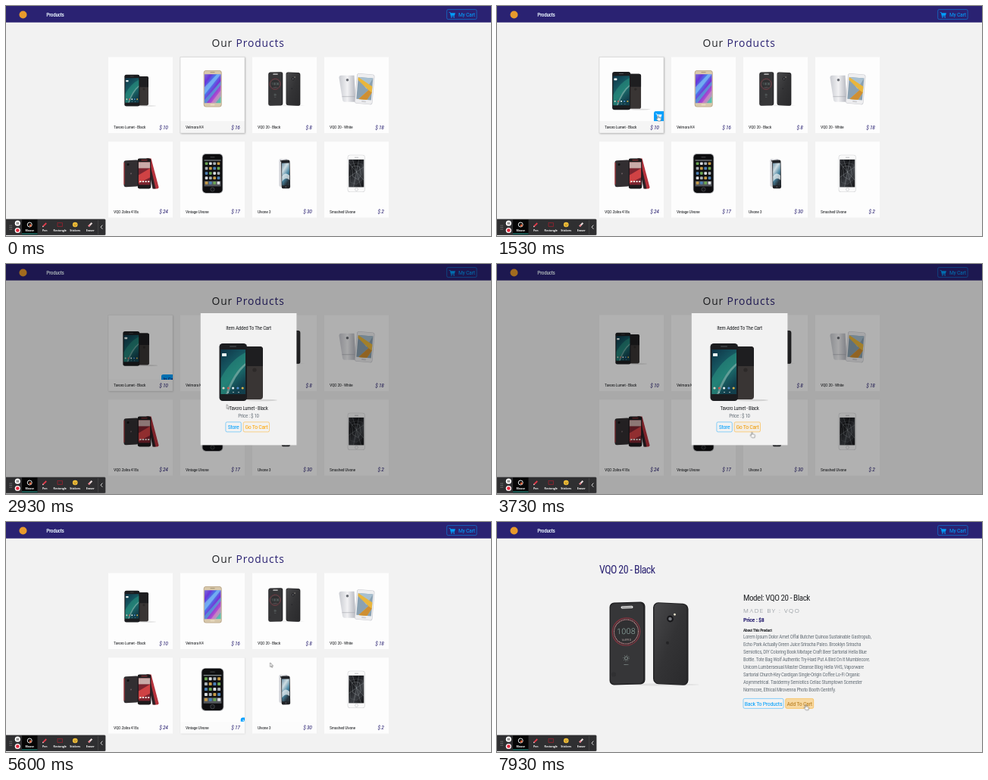
These frames come from a looping animation (640x304 px, 8 s). An HTML page:

```html
<!DOCTYPE html>
<html lang="en">
<head>
<meta charset="utf-8">
<title>Phone shop</title>
<style>
@property --h { syntax: '<number>'; inherits: true; initial-value: 0 }
@property --c { syntax: '<number>'; inherits: true; initial-value: 0 }
@property --f { syntax: '<number>'; inherits: true; initial-value: 0 }
@property --hand { syntax: '<number>'; inherits: true; initial-value: 0 }
html, body { margin: 0; width: 100%; height: 100%; overflow: hidden; background: #f2f2f2 }
body > svg { display: block; width: 100vw; height: 100vh }
text { font-family: 'Roboto Condensed', 'Open Sans Condensed', Roboto, sans-serif; font-stretch: 75%; letter-spacing: -.04em; white-space: pre }
.wide { font-family: 'Open Sans', 'Noto Sans', sans-serif; font-stretch: 100%; letter-spacing: .9px }
.airy { letter-spacing: 1.5px; font-weight: 300 }
.clock { letter-spacing: .2px; font-weight: 300 }
.label { font-family: 'Open Sans', 'Noto Sans', sans-serif; font-weight: 700; letter-spacing: 0 }
.k { animation: 8s linear infinite }
.cut { animation: 8s step-end infinite }

/* --h: picture hover, --c: card hover */
.zoom { transform: scale(calc(1 + .2 * var(--h))) }
.slide { transform: translate(calc(13px * (1 - var(--h))), calc(13px * (1 - var(--h)))) }
.lift { opacity: var(--c) }
.shade { filter: blur(.9px) }
@keyframes card0 { 0%, 5% { --h: 0; --c: 0 } 17.5%, 30% { --h: 1; --c: 1 } 42.5%, 100% { --h: 0; --c: 0 } }
@keyframes card1 { 0%, 2.5% { --c: 1 } 15%, 100% { --c: 0 } }
@keyframes card2 { 0%, 73.1% { --h: 0; --c: 0 } 81.6%, 100% { --h: .68; --c: .68 } }
@keyframes card5 { 0%, 62.5% { --h: 0; --c: 0 } 68.75% { --h: .5; --c: .3 } 75%, 100% { --h: 0; --c: 0 } }
@keyframes card6 { 0%, 69.5% { --h: 0; --c: 0 } 73.1% { --h: .29; --c: .29 } 76.7%, 100% { --h: 0; --c: 0 } }

/* --f: button fill */
.btn rect { fill: var(--col); fill-opacity: var(--f); stroke: var(--col); stroke-width: .45 }
.btn text { fill: color-mix(in srgb, #2a2a52 calc(var(--f) * 100%), var(--col)) }
@keyframes store { 0%, 56% { --f: 0 } 61.5%, 100% { --f: 1 } }
@keyframes goCart { 0%, 46.2% { --f: 0 } 52.4%, 54% { --f: .9 } 60%, 100% { --f: 0 } }
@keyframes addCart { 0%, 96.3% { --f: 0 } 100% { --f: .44 } }

@keyframes list { 0% { visibility: visible } 81.6%, 100% { visibility: hidden } }
@keyframes detail { 0% { visibility: hidden } 81.6%, 100% { visibility: visible } }
@keyframes modal { 0% { visibility: hidden } 24.2% { visibility: visible } 62.5%, 100% { visibility: hidden } }
@keyframes before { 0% { opacity: 1 } 24.2%, 100% { opacity: 0 } }
@keyframes after { 0% { opacity: 0 } 24.2%, 100% { opacity: 1 } }
@keyframes ring {
  0% { opacity: 0 } 23.25% { opacity: 1 } 25.75% { opacity: 0 }
  61.5% { opacity: 1 } 64% { opacity: 0 } 80% { opacity: 1 } 81.8%, 100% { opacity: 0 }
}
@keyframes move {
  0%, 1% { transform: translate(262px, 161px) }
  5% { transform: translate(219px, 150px) }
  8%, 28.75% { transform: translate(212.5px, 145px) }
  37.5% { transform: translate(300px, 190px) }
  44%, 54% { transform: translate(336.5px, 222.5px) }
  57.5%, 62.5% { transform: translate(299px, 216px) }
  66% { transform: translate(302px, 212px) }
  68.75% { transform: translate(316px, 204px) }
  70% { transform: translate(348.5px, 186px) }
  71.5% { transform: translate(360px, 178px) }
  73.1% { transform: translate(366px, 167px) }
  77%, 87.5% { transform: translate(368px, 120px) }
  88.25%, 90% { transform: translate(380px, 150px) }
  90.75%, 96.6% { transform: translate(396px, 200px) }
  97.5%, 100% { transform: translate(407.5px, 241.5px) }
}
@keyframes shape {
  0% { --hand: 0 } 5% { --hand: 1 } 31% { --hand: 0 } 43% { --hand: 1 } 62.5% { --hand: 0 }
  71.5% { --hand: 1 } 82% { --hand: 0 } 97.2%, 100% { --hand: 1 }
}
@keyframes appear { 0% { opacity: 0 } .75%, 100% { opacity: 1 } }
.hand { opacity: var(--hand) }
.arrow { opacity: calc(1 - var(--hand)) }
</style>
</head>
<body>
<svg id="stage" viewBox="0 0 640 304" preserveAspectRatio="none"></svg>
<script>
const BLUE = '#2a2272', SKY = '#009ffd', GOLD = '#ffa400', DARK = '#232528', GREY = '#6c757d';

const rect = (x, y, w, h, fill, r = 0, more = '') =>
  `<rect x="${x}" y="${y}" width="${w}" height="${h}" rx="${r}" fill="${fill}" ${more}/>`;
const dot = (x, y, r, fill, more = '') => `<circle cx="${x}" cy="${y}" r="${r}" fill="${fill}" ${more}/>`;
const path = (d, fill, more = '') => `<path d="${d}" fill="${fill}" ${more}/>`;
const line = (d, color, width) => path(d, 'none', `stroke="${color}" stroke-width="${width}"`);
const text = (x, y, size, str, fill = DARK, more = '') =>
  `<text x="${x}" y="${y}" font-size="${size}" fill="${fill}" ${more}>${str}</text>`;
const at = (x, y, body, more = '') => `<g transform="translate(${x} ${y}) ${more}">${body}</g>`;
const show = (name, body) => `<g class="cut" style="animation-name:${name}">${body}</g>`;
const grad = (id, x2, y2, ...stops) => `<linearGradient id="${id}" x2="${x2}" y2="${y2}">` +
  stops.map((c, i) => `<stop offset="${i / (stops.length - 1)}" stop-color="${c}"/>`).join('') + '</linearGradient>';
const mid = 'text-anchor="middle"', bold = 'font-weight="700"';

const cartIcon = (color) => path('M0 0h1.7l.4 1.2h6.2l-1 3.5H3l.2.8h4.1v.8H2.5L1.2.8H0z', color) +
  dot(3.2, 7, .8, color) + dot(6.6, 7, .8, color);

const button = (x, y, w, label, col, name = '') =>
  `<g class="btn k" style="--col:${col};animation-name:${name || 'none'}">` +
  rect(x, y, w, 13, 'none', 1.8) + text(x + w / 2, y + 9.4, 7.9, label, col, mid) + '</g>';

const defs = '<defs>' +
  grad('teal', .5, 1, '#0f3346', '#14505c', '#1c6c6c', '#123f4c') +
  grad('violet', .8, 1, '#7a6fd8', '#6a35d8', '#3d8ff0', '#7a2fd6', '#b04fd0', '#56c2b0') +
  grad('silver', 1, 0, '#c9cbd1', '#f1f1f3', '#b4b6be') +
  grad('black', 1, 1, '#48484a', '#333335', '#2a2a2c') +
  grad('mist', .5, 1, '#6f93a8', '#cfdde3', '#4a87a3', '#26323a') +
  grad('glass', .8, 1, '#34363b', '#141518', '#3c3f44', '#1c1d20') + '</defs>';

// Phones, each drawn around its own centre
const tealPhone =
  `<ellipse cx="17" cy="37" rx="21" ry="1.3" fill="#000" opacity=".13"/>` +
  rect(-13, -34, 32, 70, '#393534', 4) + path('M-9-34H15q4 0 4 4V-8H-13z', '#1e1e20') +
  dot(8, -3, 2.6, '#2c2928') +
  rect(-38.5, -38, 36.5, 76, '#1b1c1f', 4.5) + rect(-36.5, -30, 32.5, 59, 'url(#teal)') +
  path('M-36.5 8Q-24-16-4-26V-12Q-20 0-30 29h-6.5z', '#2c9a84', 'opacity=".5"') +
  path('M-30 29Q-20 0-4-12V-9Q-18 4-27 29z', '#a9d3c6', 'opacity=".5"') +
  rect(-35, -25, 6, 4, '#e9f2f2', .6) + rect(-25, -34.5, 9, .9, '#55585c', .4) +
  ['#d9d4c8', '#c95a50', '#e6eef0', '#4f8fd0', '#d6b24c'].map((c, i) => dot(-33 + i * 6.3, 21, 1.6, c)).join('') +
  [0, 1, 2].map(i => dot(-27 + i * 7, 26.5, .7, '#e8eeee')).join('');

const goldPhone = rect(-11.8, -24.3, 24, 48.6, '#b9a587', 3.5) + rect(-11, -23.5, 22.4, 47, '#d8c8ab', 3) +
  rect(-10.6, -19, 21.6, 38, 'url(#violet)') +
  path('M-10.6-2 6-19H11L-10.6 8z', '#8fc7f5', 'opacity=".6"') +
  path('M-10.6 15 11-10V-5L-8 19h-2.6z', '#3fd0d8', 'opacity=".55"') +
  path('M11 2v8L4 19H-2z', '#ef9ac0', 'opacity=".5"') +
  rect(-3, -21.8, 6, .7, '#8f7d5b') + rect(-3, 20.2, 6, 2, '#e7dac0', 1);

const blackPhone =
  `<ellipse cx="20" cy="54" rx="46" ry="1.5" fill="#000" opacity=".07"/>` +
  `<g transform="translate(-29 0) skewY(-1.5)">` +
  rect(-23.5, -55, 47, 109, '#232325', 6) + rect(-22, -53.5, 43, 106, '#363638', 5) +
  rect(-8.5, -50, 16, 3.2, '#e4e4e4', 1.6) + rect(-7, -48.9, 13, 1, '#777') +
  dot(-1.5, -16, 18.2, '#303032', 'stroke="#85333f" stroke-width="1.2"') +
  dot(-1.5, -16, 16, 'none', 'stroke="#d08a90" stroke-width="1.1" stroke-dasharray="1.2 .6"') +
  text(-1.5, -13, 10.5, '1008', '#a9c8c0', mid + ' class="wide clock"') +
  text(-1.5, -4, 3.8, '14 APR D', '#b9a9a9', mid) +
  dot(-1.5, 19, 2.1, 'none', 'stroke="#9fb0ac" stroke-width=".7"') +
  dot(-1.5, 19, 3.8, 'none', 'stroke="#9fb0ac" stroke-width=".9" stroke-dasharray=".7 2.3"') +
  rect(-4.5, 27, 6, .6, '#8d9996') + dot(-18, 40, 3, '#303032') + '</g>' +
  `<g transform="translate(28 0) skewY(2.5)">` +
  rect(-23, -54, 46.5, 108, '#222224', 7) + rect(-21.5, -53, 43, 106, 'url(#black)', 6) +
  dot(-.5, -33, 4.4, '#17171a') + dot(-.5, -33, 2.3, '#77797e') + dot(5.5, -39, 1.4, '#e6e0cb') +
  dot(-4, -1, 2, '#242426') + '</g>';

const whitePhone = path('M-20-18H-3L-1 17H-16Q-18 17-18.500 14L-23-15Q-23-18-20-18z', 'url(#silver)') +
  dot(-12, -12, 1.8, '#6b6e75') + line('M-19 10-2 10', '#a3a5ac', .6) +
  at(11, 0, rect(-12, -20, 23.5, 40, '#c9cacf', 3) + rect(-11.4, -19.4, 22.3, 38.8, '#eeeef0', 2.6) +
  rect(-10, -15, 19.6, 29, '#8aa1b2') + path('M-10-15H9.600L2 0z', '#a8c0d0') +
  path('M-10-11 5 1-7 14H4L9.600 4V-4L-10-15z', '#e9b63c') + path('M5 1-7 14H4L9.600 4z', '#cf8f32') +
  rect(-3, 15.6, 6, 2, '#cfd0d4', 1), 'rotate(5)');

const redPhone = path('M8-20H14L24 18Q24 20 22 20H17z', '#b5323c') + path('M8-20H11L20 20H16z', '#2d2226') +
  at(-12.5, 0, rect(-9.5, -17.5, 19, 35, '#322e31', 2.6) + line('M-9-15V14', '#c63d43', 1) +
  dot(-4, -12, 1.5, '#111') + dot(0, 0, 1, '#6b5c60'), 'skewY(-3)') +
  at(5, 0, rect(-8.8, -20, 17.6, 40, '#1d1a1c', 2.4) + rect(-7.6, -15, 15.2, 30, '#7c2530') +
  rect(-7.6, -15, 15.2, 8, '#c9aaa8') + path('M-7.6 2 7.6-7V5L-7.6 13z', '#cf4244') +
  [0, 1, 2, 3].map(i => rect(-6.2 + i * 3.6, 9.5, 2.2, 2.2, '#eadfd9', .4)).join('') + rect(-4, -18, 8, .8, '#c63d43'));

const iconColors = ['#6aa552', '#c79b45', '#d9dde0', '#4a7fb5', '#a9b0b6'];
const classicPhone = rect(-13.8, -26.3, 27.6, 52.6, '#a5a7aa', 5) + rect(-13, -25.5, 26, 51, '#0e0e10', 4.4) +
  rect(-3, -22, 6, .9, '#55575a', .4) + rect(-11, -18, 22, 35, '#0f1012') + rect(-11, -18, 22, 1.2, '#7f868c') +
  rect(-11, 10, 22, 7, '#53575c') +
  Array.from({ length: 20 }, (_, i) =>
    rect(-9.8 + i % 4 * 5.3, -15 + (i >> 2) * 6.4, 3.7, 3.7, iconColors[(i * 7 + (i >> 2)) % 5], .8)).join('') +
  dot(0, 21, 2.6, '#16171a', 'stroke="#66686c" stroke-width=".5"');

const slimPhone = rect(-7, -19.5, 11, 37, 'url(#silver)', 2) + dot(-4.6, -16.6, 1, '#444') +
  at(1.5, .8, rect(-5.6, -18.6, 11.4, 37.6, '#202226', 2) + rect(-4.8, -14.6, 9.8, 29.5, 'url(#mist)') +
  path('M-4.8 3Q0-4 5 2V8Q0 3-4.8 10z', '#eef3f4', 'opacity=".7"') + dot(0, 17, 1.1, '#43464b'), 'rotate(-1)');

const crackedPhone = rect(-11.8, -24.7, 23, 49.4, '#d2d3d5', 3.4) + rect(-11.2, -24.1, 21.8, 48.2, '#fafafa', 3) +
  rect(-10.2, -18.5, 20, 36.5, 'url(#glass)') +
  line('M0-2-10-14M0-2-10 5M0-2-4 18M0-2 6 18M0-2 10 9M0-2 10-9M0-2 3-18M0-2-5-18M-6-9-5 4 2 8 6 2 4-9-2-10z', '#b9bdc2', .3) +
  line('M-8-5-8 12 0 14 8 8 8-12 1-14-8-12', '#85898e', .25) +
  dot(0, 21, 2, 'none', 'stroke="#b9bbbe" stroke-width=".5"') + rect(-2.5, -21.6, 5, .7, '#a4a6a9');

const products = [
  ['Tavoro Lumet - Black', 10, at(0, 2, tealPhone, 'scale(.55)')],
  ['Velmora K4', 16, at(0, -.5, goldPhone)],
  ['VQO 20 - Black', 8, at(0, 0, blackPhone, 'scale(.405)')],
  ['VQO 20 - White', 18, whitePhone],
  ['VQO Zolira 418s', 24, redPhone],
  ['Vintage Ulvone', 17, classicPhone],
  ['Ulvone 3', 30, slimPhone],
  ['Smashed Ulvone', 2, crackedPhone]
];
const moving = [0, 1, 2, 5, 6];

const cartCorner = path('M0 13V2.7Q0 0 2.7 0H13V13z', SKY) + at(2.4, 3, cartIcon('#eaf6ff'));
const inCart = path('M-9 13V2.7Q-9 0-6.3 0H13V13z', SKY) + text(2, 9.3, 7.2, 'In Cart', BLUE, mid);

const card = ([name, price, phone], i) => {
  const tab = i ? cartCorner : show('before', cartCorner) + show('after', inCart);
  return `<g transform="translate(${135 + i % 4 * 95} ${i < 4 ? 67.5 : 179.2})">` +
    `<g class="k" style="animation-name:${moving.includes(i) ? 'card' + i : 'none'}">` +
    `<g class="lift">${rect(.7, .7, 85, 100.5, '#000', 0, 'class="shade" opacity=".3"')}</g>` +
    rect(0, 0, 85, 100.5, '#fdfdfd') +
    `<g class="lift">${rect(0, 84.6, 85, 15.9, '#f5f5f5') + rect(0, 0, 85, 100.5, 'none', 0, 'stroke="#c4c4c4" stroke-width=".4"')}</g>` +
    `<svg width="85" height="84.6"><g transform="translate(42.5 42.2)"><g class="zoom">${phone}</g></g>` +
    `<g transform="translate(72 71.6)"><g class="slide">${tab}</g></g></svg>` +
    text(7, 94.6, 5.7, name) +
    text(78.6, 95.3, 7.5, '$ ' + price, BLUE, 'text-anchor="end" font-style="italic"') + '</g></g>';
};

const nav = rect(0, 0, 640, 21.7, BLUE) + dot(22.5, 11.5, 5, '#e89a2c') +
  text(53.2, 14.2, 7.2, 'Products', '#eaf6ff', 'font-weight="500"') +
  rect(581.7, 4.6, 39.4, 13, 'none', 1.8, `stroke="${SKY}" stroke-width=".5"`) +
  at(584.6, 8, cartIcon(SKY)) + text(597, 14.3, 7.8, 'My Cart', SKY);

const list = `<text class="wide" x="271.5" y="53.5" font-size="13.8" fill="${DARK}">Our <tspan fill="${BLUE}">Products</tspan></text>` +
  products.map(card).join('');

const about = [
  'Lorem Ipsum Dolor Amet Offal Butcher Quinoa Sustainable Gastropub,',
  'Echo Park Actually Green Juice Sriracha Paleo. Brooklyn Sriracha',
  'Semiotics, DIY Coloring Book Mixtape Craft Beer Sartorial Hella Blue',
  'Bottle. Tote Bag Wolf Authentic Try-Hard Put A Bird On It Mumblecore.',
  'Unicorn Lumbersexual Master Cleanse Blog Hella VHS, Vaporware',
  'Sartorial Church-Key Cardigan Single-Origin Coffee Lo-Fi Organic',
  'Asymmetrical. Taxidermy Semiotics Celiac Stumptown Scenester',
  'Normcore, Ethical Mirovenna Photo Booth Gentrify.'
];
const detail = text(135, 67.8, 13.9, 'VQO 20 - Black', BLUE) + at(201, 161, blackPhone) +
  text(325, 104.3, 11.1, 'Model: VQO 20 - Black') +
  text(325, 119.7, 8, 'MADE BY : VQO', GREY, 'class="wide airy"') +
  text(325, 131.8, 8, 'Price : $8', BLUE, bold) +
  text(325, 144.8, 5.4, 'About This Product', DARK, bold) +
  about.map((row, i) => text(325, 154.4 + i * 10, 6.75, row, GREY)).join('') +
  button(325, 233.4, 53, 'Back To Products', SKY) + button(380.7, 233.4, 37, 'Add To Cart', GOLD, 'addCart');

const modal = rect(0, 0, 640, 304, '#000', 0, 'opacity=".3"') + rect(256.8, 65, 126.6, 174.4, '#f2f2f2') +
  text(320, 87.4, 7.1, 'Item Added To The Cart', DARK, mid) + at(320, 143, tealPhone) +
  text(320, 192.6, 6.9, products[0][0], DARK, mid) + text(320, 203.4, 7, 'Price : $ 10', GREY, mid) +
  button(289.9, 208.9, 20.4, 'Store', SKY, 'store') + button(313.2, 208.9, 34.3, 'Go To Cart', GOLD, 'goCart');

const tools = [
  ['Mouse', dot(0, 0, 3, 'none', 'stroke="#fff" stroke-width=".9"') + dot(1, 1, 1.5, '#e8643c')],
  ['Pen', line('M-2.4 2.4 2-2', '#e33b4b', 1.8) + path('M-3.2 3.2l.5-1.8 1.3 1.3z', '#fff')],
  ['Rectangle', rect(-3.2, -2.4, 6.4, 4.8, 'none', 0, 'stroke="#b3202f" stroke-width=".9" stroke-dasharray="1.5 .5"')],
  ['Stickers', dot(0, 0, 3.3, '#f7c53a') + dot(-1.1, -.8, .5, '#5a3a12') + dot(1.1, -.8, .5, '#5a3a12') + line('M-1.6 .8Q0 2.6 1.6 .8', '#5a3a12', .5)],
  ['Eraser', line('M-2.2 2.2 2.2-2.2', '#e9dcdc', 2.2) + line('M-2.2 2.2-.6 .6', '#e0737f', 2.2)]
];
const toolbar = rect(-2, 281.4, 133.5, 21.6, '#5b5b5d', 1.5) + rect(-2, 282, 132.9, 20.5, '#2f2f31', 1.2) +
  rect(21, 282.3, 20.5, 20, '#060606') + rect(21, 300.6, 20.5, .9, '#2cb5a8') +
  [290, 292.5, 295].map(y => dot(5.2, y, .5, '#bbb') + dot(7.2, y, .5, '#bbb')).join('') +
  dot(15.3, 287.2, 3.6, '#fff') + rect(14, 285.7, .9, 3, '#333') + rect(15.8, 285.7, .9, 3, '#333') +
  dot(15.3, 296.5, 3.6, '#fff') + dot(15.3, 296.5, 2.3, '#e0283c') +
  tools.map(([name, icon], i) => at(31.2 + i * 20, 289, icon) +
    text(31.2 + i * 20, 297.9, 3.5, name, '#fff', `class="label" ${mid}`)).join('') +
  rect(121, 283, .5, 19, '#555') + line('M127.3 289.6 125 292.2 127.3 294.8', '#fff', .8);

const outline = 'stroke="#2b2b2b" stroke-width=".45" stroke-linejoin="round"';
const cursor = show('appear', `<g class="k" style="animation-name:move">` +
  show('shape',
    `<g class="arrow">${path('M0 0V5.6L1.3 4.5 2.2 6.5 3.1 6.1 2.2 4.2H3.9z', '#fff', outline)}</g>` +
    `<g class="hand">${path('M-.7 .3Q0-.6 .7 .3V2.5L3.2 3.1Q4.2 3.4 4 4.5L3.4 7H0L-2.4 4Q-2.3 3-1.3 3.4L-.7 4z', '#fff', outline)}</g>`) +
  show('ring', dot(0, 0, 10.8, '#e0263c', 'fill-opacity=".06" stroke="#e0263c" stroke-width="1.1"')) + '</g>');

document.getElementById('stage').innerHTML = defs + rect(0, 0, 640, 304, '#f2f2f2') + nav +
  show('list', list) + show('detail', detail) + show('modal', modal) + toolbar + cursor;
</script>
</body>
</html>
```
